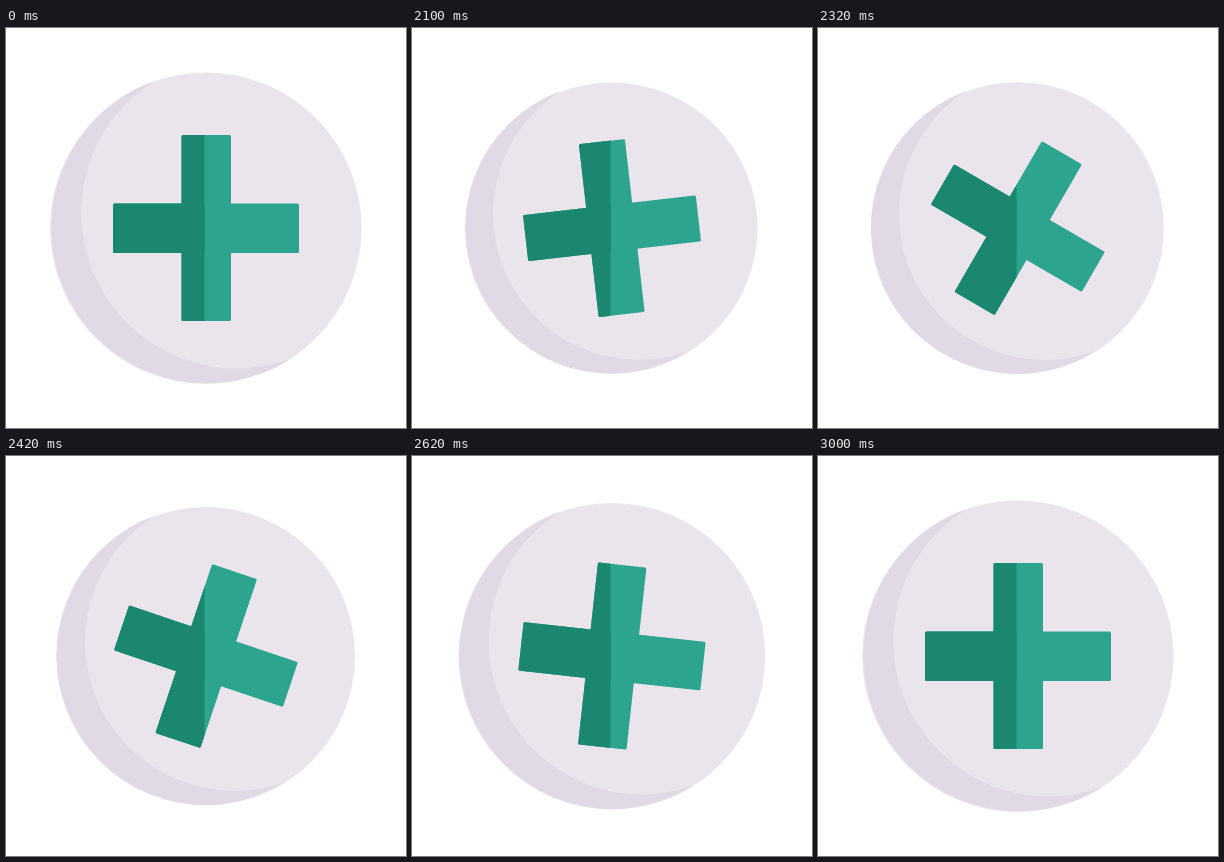
An HTML page that plays this animation: 400x400 px, repeating every 3.02 s.

```html
<!DOCTYPE html>
<html lang="en">
<head>
<meta charset="utf-8">
<title>Medical cross</title>
<style>
  html, body { margin: 0; width: 100%; height: 100%; overflow: hidden; background: #fff; }
  svg { display: block; width: 100%; height: 100%; }
</style>
</head>
<body>
<svg viewBox="0 0 400 400">
  <defs>
    <clipPath id="leftHalf"><rect width="198.5" height="400"/></clipPath>
    <g id="cross">
      <rect x="107" y="175.5" width="186" height="49.5" rx="1.5"/>
      <rect x="175.5" y="107" width="49.5" height="186" rx="1.5"/>
    </g>
  </defs>
  <circle id="disc" cx="199.8" cy="200.2" r="155.7" fill="#eae5ec"/>
  <path id="shade" fill="#e1d9e6"
    d="M147.7 53.3A155.7 155.7 0 1 0 284.4 331.1A155.7 155.7 0 0 1 147.7 53.3Z"/>
  <use class="cross" href="#cross" fill="#2da48e"/>
  <g clip-path="url(#leftHalf)"><use class="cross" href="#cross" fill="#1b876e"/></g>
</svg>
<script>
  const LOOP = 3020, REST = 2020, STEP = 25, STEPS = 40;
  const SHRINK = 0.1, SHRINK_END = 1 / 6;

  const disc = document.getElementById('disc');
  const shade = document.getElementById('shade');
  const crosses = document.querySelectorAll('.cross');

  // Bezier easing with flat ends: control points (x1, 0) and (x2, 1).
  function ease(x, x1, x2) {
    if (x <= 0) return 0;
    if (x >= 1) return 1;
    let lo = 0, hi = 1;
    for (let i = 0; i < 30; i++) {
      const s = (lo + hi) / 2, r = 1 - s;
      if (3 * s * r * r * x1 + 3 * s * s * r * x2 + s ** 3 < x) lo = s;
      else hi = s;
    }
    return lo * lo * (3 - 2 * lo);
  }

  // Progress advances in 25 ms steps on a 10 ms clock.
  function progressAt(t) {
    if (t < REST) return 1;
    const ticks = Math.floor((t - REST) / 10) * 10;
    return Math.min(1, (Math.floor(ticks / STEP) + 1) / STEPS);
  }

  function scaleAt(p) {
    const amount = p < SHRINK_END
      ? ease(p / SHRINK_END, 1 / 3, 2 / 3)
      : 1 - ease((p - SHRINK_END) / (1 - SHRINK_END), 0.08, 0.28);
    return 1 - SHRINK * amount;
  }

  function place(el, x, y, scale, angle = 0) {
    el.setAttribute('transform',
      `translate(${x} ${y}) rotate(${angle}) scale(${scale}) translate(${-x} ${-y})`);
  }

  function draw(t) {
    const p = progressAt(t);
    const scale = scaleAt(p);
    const angle = 90 * (1 - ease(p, 0.267, 0.05));
    place(disc, 199.8, 200.2, scale);
    place(shade, 164.3, 204.6, scale);
    crosses.forEach(el => place(el, 200, 200, scale, angle));
  }

  const start = performance.now();
  function tick() {
    draw((performance.now() - start) % LOOP);
    requestAnimationFrame(tick);
  }
  tick();
</script>
</body>
</html>
```
